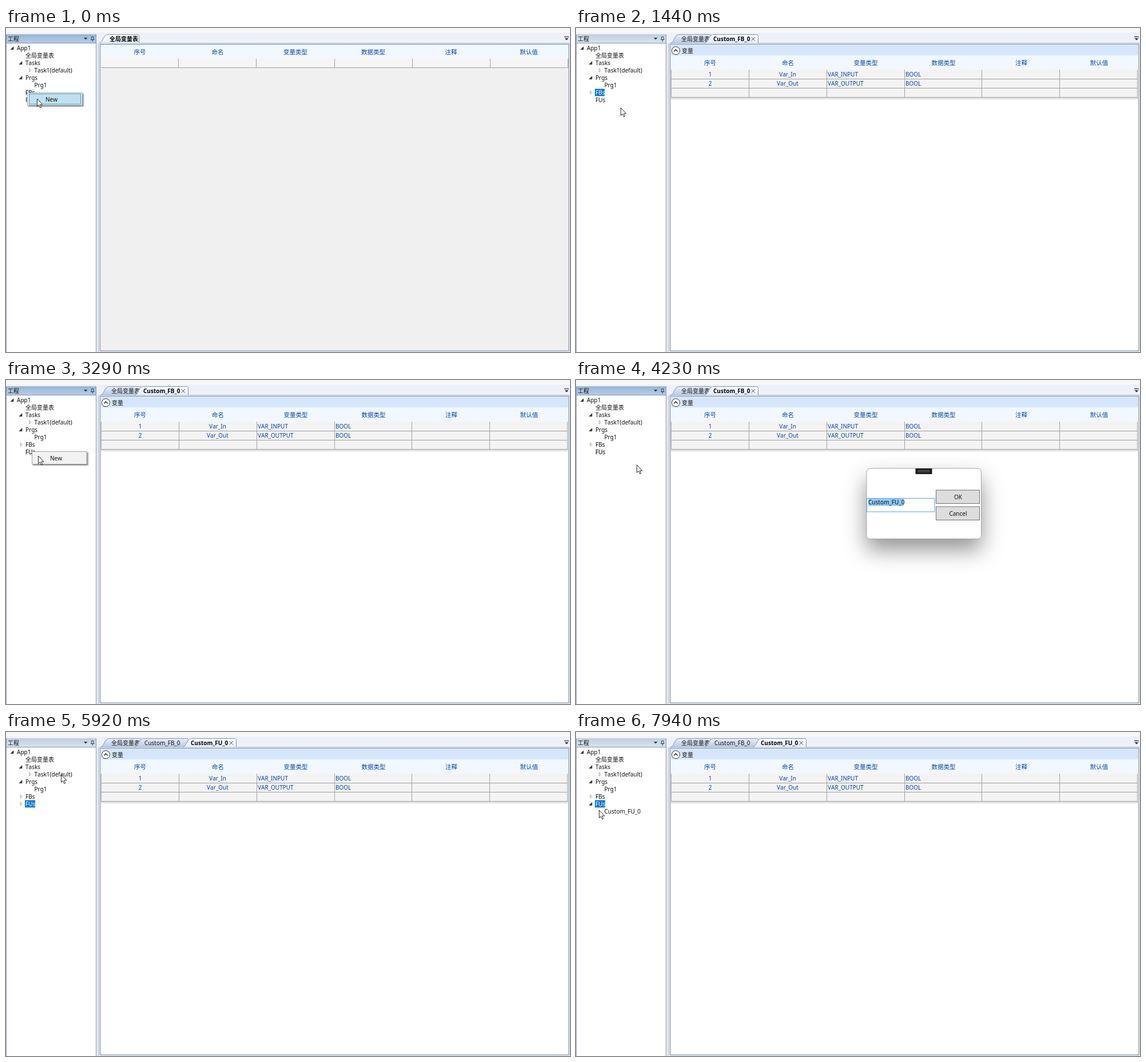
Recreate the animation shown at these times as an HTML page. Size 986x568 px, loop 8000 ms.

```html
<!DOCTYPE html>
<html lang="zh">
<head>
<meta charset="utf-8">
<style>
html, body { margin: 0; width: 100%; height: 100%; overflow: hidden; background: #f6f7f9; }
svg { display: block; font: 10px 'Noto Sans', 'Noto Sans CJK SC', 'Noto Sans CJK', sans-serif; font-kerning: none; }
</style>
</head>
<body>
<svg id="stage" width="986" height="568" viewBox="0 0 986 568">
  <defs>
    <linearGradient id="active" x2="0" y2="1"><stop stop-color="#99b4d1"/><stop offset="1" stop-color="#b5cdea"/></linearGradient>
    <linearGradient id="idle" x2="0" y2="1"><stop stop-color="#bfcddb"/><stop offset="1" stop-color="#d7e4f2"/></linearGradient>
    <linearGradient id="tabOn" x2="0" y2="1"><stop stop-color="#fff"/><stop offset="1" stop-color="#e3eefa"/></linearGradient>
    <linearGradient id="tabOff" x2="0" y2="1"><stop stop-color="#e9eff7"/><stop offset="1" stop-color="#b7cae2"/></linearGradient>
    <linearGradient id="head" x2="0" y2="1"><stop stop-color="#f0f8ff"/><stop offset="1" stop-color="#f2f7fd"/></linearGradient>
    <filter id="soft" x="-40%" y="-40%" width="180%" height="220%"><feDropShadow dx="0" dy="19" stdDeviation="19" flood-opacity=".42"/></filter>
    <filter id="drop"><feDropShadow dx="2" dy="2" stdDeviation=".8" flood-opacity=".5"/></filter>
  </defs>
  <g id="view"></g>
</svg>
<script>
const LOOP = 8000;
const FB_MADE = 1060, FU_CLICK = 2680, FU_MENU = 3140, FU_MADE = 4985, EXPAND = 7640;
const INK = '#111', BLUE = '#0b43ab', GRID = '#a0a0a0', EDGE = '#8794a9';
const COLUMNS = ['序号', '命名', '变量类型', '数据类型', '注释', '默认值'];

// Pointer path: time, x, y
const PATH = [
  [0, 54, 124], [300, 54, 124], [600, 630, 218], [680, 652, 215], [830, 653, 206], [1000, 653, 206],
  [1440, 78, 140], [1670, 42, 125], [1750, 42, 125], [2050, 28, 112], [2200, 28, 112],
  [2530, 45, 126], [3140, 45, 126], [3290, 56, 133], [3460, 60, 144], [4200, 60, 144],
  [4600, 652, 206], [4840, 652, 205], [4920, 648, 197], [4990, 603, 190], [5620, 88, 78],
  [5900, 88, 78], [6200, 203, 31], [6300, 203, 31], [6710, 31, 116], [6780, 30, 117],
  [7100, 44, 129], [7560, 27, 125], [7840, 27, 125], [7940, 40, 137], [LOOP, 40, 137]
];

const rect = (x, y, w, h, fill, stroke = 'none', more = '') =>
  `<rect x="${x}" y="${y}" width="${w}" height="${h}" fill="${fill}" stroke="${stroke}" ${more}/>`;
const path = (d, fill = 'none', stroke = 'none', more = '') =>
  `<path d="${d}" fill="${fill}" stroke="${stroke}" ${more}/>`;
const text = (x, mid, s, fill = INK, more = '') =>
  `<text x="${x}" y="${mid + 3.7}" fill="${fill}" ${more}>${s}</text>`;
const centered = (x, mid, s, fill, size = 10) =>
  text(x, mid, s, fill, `text-anchor="middle" font-size="${size}"`);
const within = (p, x, y, w, h) => p.x >= x && p.x <= x + w && p.y >= y && p.y <= y + h;
const clamp = v => Math.max(0, Math.min(1, v));

function pointerAt(t) {
  const i = Math.max(1, PATH.findIndex(k => k[0] > t));
  const [t0, x0, y0] = PATH[i - 1], [t1, x1, y1] = PATH[i];
  const k = (t - t0) / (t1 - t0);
  return { x: x0 + (x1 - x0) * k, y: y0 + (y1 - y0) * k };
}

function arrow(x, y, open, hover) {
  return open
    ? path(`M${x + 5} ${y - 2.5}v5h-5z`, hover ? '#1cc4f7' : '#333', hover ? '#1cc4f7' : '#222', 'stroke-width=".6"')
    : path(`M${x + 2} ${y - 3}l3.4 3l-3.4 3z`, '#fff', hover ? '#1cc4f7' : '#999', 'stroke-width=".9"');
}

function treePanel(t, p) {
  const focused = t < FB_MADE || (t >= FU_CLICK && t < FU_MADE);
  let s = rect(.5, 11.5, 157, 570, '#fff', EDGE) +
    rect(1, 11, 156, 15.5, `url(#${focused ? 'active' : 'idle'})`) +
    path('M1 26.5h156', 'none', EDGE) +
    text(3, 19, '工程') + path('M136 17h6.4l-3.2 3.4z', '#26364f') +
    path('M149.5 15.5h3.5v5h-3.5zM148 20.5h6.5M151.3 21v3', 'none', '#26364f', 'stroke-width=".9"');

  const row = i => 35.3 + 12.95 * i;
  const rows = [[19, 'App1'], [34, '全局变量表'], [34, 'Tasks'], [49.5, 'Task1(default)'], [34, 'Prgs'], [49.5, 'Prg1'], [34, 'FBs'], [34, 'FUs']];
  if (t >= EXPAND) rows.push([49.5, 'Custom_FU_0']);
  const selected = t < FU_CLICK ? 6 : 7;
  const strong = (t >= FB_MADE && t < FU_MENU) || t >= FU_MADE;
  rows.forEach(([x, name], i) => {
    const on = i === selected;
    if (on) s += rect(33, row(i) - 6.4, i === 6 ? 17 : 18, 12.8, strong ? '#0078d7' : '#efefef');
    s += text(x, row(i), name, on && strong ? '#fff' : INK);
  });
  s += arrow(8, row(0), true) + arrow(23, row(2), true) + arrow(38.5, row(3), false) + arrow(23, row(4), true);
  const hover = i => within(p, 22, row(i) - 6.5, 9, 12.9);
  if (t >= FB_MADE) s += arrow(23, row(6), false, hover(6));
  if (t >= FU_MADE) s += arrow(23, row(7), t >= EXPAND, hover(7));
  return s;
}

function tab(left, right, name, on, textX) {
  const d = `M${left} 26.5C${left + 6} 25 ${left + 7} 11.5 ${left + 14} 11.5H${right - 2}q2 0 2 2V26.5`;
  let s = path(d, `url(#${on ? 'tabOn' : 'tabOff'})`, EDGE) +
    text(textX, 19, name, on ? '#000' : INK, on ? 'font-weight="700"' : '');
  if (on && left > 200) s += path(`M${right - 12} 16l6.4 6.4m0-6.4l-6.4 6.4`, 'none', '#444');
  return s;
}

function tabs(t) {
  const globals = '全局变量表';
  if (t < FB_MADE) return tab(163.5, 232.5, globals, true, 181);
  const first = tab(165.5, 236.5, globals, false, 184);
  if (t < FU_MADE) return first + tab(225.5, 318.5, 'Custom_FB_0', true, 240);
  return first + tab(225.5, 318.5, 'Custom_FB_0', false, 242) + tab(309.5, 402.5, 'Custom_FU_0', true, 323);
}

const headings = (mid, x = 234) =>
  COLUMNS.map((name, i) => centered(x + 136 * i, mid, name, BLUE, 10.5)).join('');

function globalsTable() {
  let s = rect(166, 30, 817, 536, '#f0f0f0') + rect(166, 30, 817, 24, 'url(#head)') +
    rect(166, 54, 817, 16, '#f5f5f3') + headings(42);
  for (const x of [301.5, 437.5, 574.5, 710.5, 846.5, 982.5]) s += path(`M${x} 54v16`, 'none', GRID);
  return s + path('M166 69.5h817', 'none', GRID);
}

function blockTable() {
  let s = rect(166, 30, 817, 536, '#fff') + rect(166, 30, 817, 18.5, '#d5e6fa') +
    `<circle cx="174.5" cy="39.7" r="7" fill="#fff" stroke="#333"/>` +
    path('M171.3 41.3l3.2-3.2l3.2 3.2', 'none', '#222', 'stroke-width="1.4"') + text(185, 40, '变量') +
    rect(166, 48.5, 817, 24, 'url(#head)') + rect(166, 72.5, 816, 49, '#f3f3f3') +
    rect(166, 122, 817, 3, '#dde0e4') + headings(61, 234.5);
  for (const x of [166.5, 302.5, 438.5, 574.5, 709.5, 845.5, 981.5]) s += path(`M${x} 73v49`, 'none', GRID);
  s += path('M166 89.5h816M166 105.5h816M166 121.5h816', 'none', GRID);
  [['Var_In', 'VAR_INPUT'], ['Var_Out', 'VAR_OUTPUT']].forEach(([name, kind], i) => {
    const y = 80.8 + 16.4 * i;
    s += centered(234.5, y, i + 1, BLUE) + centered(370, y, name, BLUE) +
      text(440, y, kind, BLUE) + text(576, y, 'BOOL', BLUE);
  });
  return s;
}

function menu(x, y, lit) {
  return `<g filter="url(#drop)">${rect(x + .5, y + .5, 95.5, 22, '#f2f2f2', '#a5a5a5')}</g>` +
    (lit ? rect(x + 3.5, y + 2.5, 90, 18, '#c0e0ee', '#35a3d6') : '') + text(x + 32, y + 12, 'New');
}

function dialog(p, name, alpha) {
  const button = (y, label) => {
    const hot = within(p, 630, y, 75, 24);
    return rect(629.5, y + .5, 76, 23.5, hot ? '#bee6fd' : '#ddd', hot ? '#3c7fb1' : '#707070') +
      centered(668, y + 12.6, label, INK);
  };
  return `<g opacity="${alpha}"><g filter="url(#soft)">${rect(508, 155, 200.5, 123.5, '#fff', '#a2a2a2', 'rx="6"')}</g>` +
    rect(593.5, 155, 29, 10, '#1f1f1f') + rect(598.5, 158.5, 19, 2.5, '#333', '#606060', 'stroke-width=".8"') +
    rect(508.5, 207.5, 118.5, 23.5, '#fff', '#569de5') + rect(511, 208.3, 62, 12.4, '#8fc7f4') +
    text(511, 214.2, name) + button(192.5, 'OK') + button(221.5, 'Cancel') + '</g>';
}

const fade = (t, start, end) => clamp((t - start) / 130) * clamp((end - t) / 60);

function draw(t) {
  const p = pointerAt(t);
  let s = rect(0, 8, 986, 560, '#eef1fa') + treePanel(t, p) +
    rect(158, 27, 5, 541, '#e9edf5') + path('M161.5 27v541', 'none', '#b2bccb') +
    rect(163, 26.5, 823, 3, '#e6eef8') + path('M163 26.5h823', 'none', '#b2bccb') + tabs(t) +
    path('M976 15.5h8', 'none', '#333', 'stroke-width="1.3"') + path('M976.5 18h7l-3.5 3.6z', '#333') +
    (t < FB_MADE ? globalsTable() : blockTable()) +
    rect(164.5, 28.5, 819.5, 537.5, 'none', EDGE, 'stroke-width="1.2"');
  if (t < 70) s += menu(37, 113, true);
  if (t >= FU_MENU && t < 3690) s += menu(45, 125, t > 3380);
  const a = fade(t, 230, 1030), b = fade(t, 3850, 4900);
  if (a) s += dialog(p, 'Custom_FB_0', a);
  if (b) s += dialog(p, 'Custom_FU_0', b);
  s += path(`M${p.x + .5} ${p.y}v13.6l3-2.8l2.2 5l2.1-.9l-2.1-4.8h4.1z`, '#fff', '#111', 'stroke-width=".9"');
  view.innerHTML = s;
}

const view = document.getElementById('view');
const start = performance.now();
function tick() {
  draw((performance.now() - start) % LOOP);
  requestAnimationFrame(tick);
}
tick();
</script>
</body>
</html>
```
